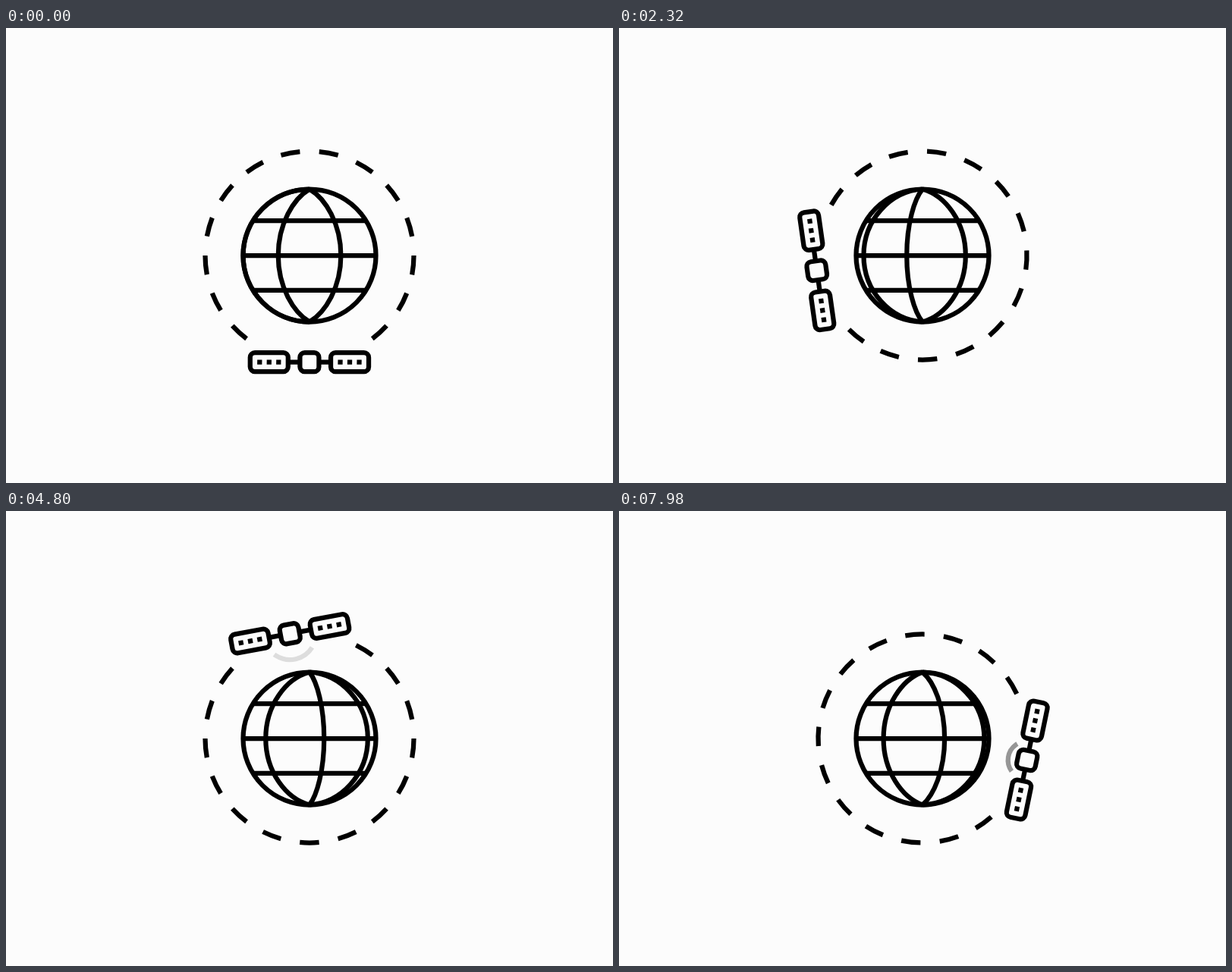
An HTML page with a canvas that plays this animation: 800x600 px, repeating every 8 s.

```html
<!DOCTYPE html>
<html lang="en">
<head>
<meta charset="utf-8">
<title>Satellite orbiting a globe</title>
<style>
  html, body { margin: 0; height: 100%; overflow: hidden; background: #fcfcfc; }
  canvas { display: block; }
</style>
</head>
<body>
<canvas width="800" height="600"></canvas>
<script>
const ctx = document.querySelector('canvas').getContext('2d');

const LOOP = 8000;
const ORBIT_TIME = 10200;
const MERIDIAN_TIME = ORBIT_TIME / 10;
const PULSE_TIME = ORBIT_TIME / 8;
const FADE = 255;

const BACKGROUND = '#fcfcfc';
const GLOBE_R = 87.5;
const ORBIT_R = 137.5;
const SATELLITE_R = 140.625;
const DASH_STEP = 2 * Math.PI / 17;

const lerp = (a, b, k) => a + (b - a) * k;
const clamp = v => Math.min(1, Math.max(0, v));

function stroke(draw) {
  ctx.beginPath();
  draw();
  ctx.stroke();
}

function line(x1, y1, x2, y2) {
  stroke(() => { ctx.moveTo(x1, y1); ctx.lineTo(x2, y2); });
}

function arc(r, from, to) {
  stroke(() => ctx.arc(0, 0, r, from, to));
}

// phase runs from -1.5 (left rim) to 1.5 (right rim); within ±0.5 the curve is a pointed lens side
function drawMeridian(phase) {
  const h = Math.abs(phase);
  const m = Math.min(1, 2 * h);
  const w = Math.max(0, h - 0.5);
  const width = Math.sign(phase) * (m + 0.15 * m * (1 - m * m));
  const round = w + 0.3 * w * (1 - w);

  const x = width * lerp(41.3, GLOBE_R, round);
  const tipX = width * lerp(21, 48.3, round);
  const tipY = GLOBE_R - lerp(12.5, 0, round);
  const sideY = lerp(42, 48.3, round);
  stroke(() => {
    ctx.moveTo(0, -GLOBE_R);
    ctx.bezierCurveTo(tipX, -tipY, x, -sideY, x, 0);
    ctx.bezierCurveTo(x, sideY, tipX, tipY, 0, GLOBE_R);
  });
}

function drawGlobe(t) {
  arc(GLOBE_R, 0, 2 * Math.PI);
  for (const y of [-45.8, 0, 45.8]) {
    const half = Math.sqrt(GLOBE_R ** 2 - y ** 2);
    line(-half, y, half, y);
  }
  const turn = t / MERIDIAN_TIME % 1;
  for (const start of [-1.5, -0.5, 0.5]) drawMeridian(start + turn);
}

function drawOrbit() {
  for (let k = -6.5; k <= 6.5; k++) {
    const middle = k * DASH_STEP - Math.PI / 2;
    arc(ORBIT_R, middle - DASH_STEP / 4, middle + DASH_STEP / 4);
  }
}

function drawBox(x, width) {
  ctx.beginPath();
  ctx.roundRect(x - width / 2, -12.5, width, 25, 6.25);
  ctx.fillStyle = BACKGROUND;
  ctx.fill();
  ctx.stroke();
}

function drawWave(r, age, fadeIn, fadeOut) {
  const spread = 0.83;
  ctx.globalAlpha = clamp((age - fadeIn) / FADE) * (1 - clamp((age - fadeOut) / FADE));
  arc(r, -Math.PI / 2 - spread, -Math.PI / 2 + spread);
  ctx.globalAlpha = 1;
}

function drawSatellite(t) {
  const age = t % PULSE_TIME;
  drawWave(25, age, 228, 702);
  drawWave(34.4, age, 370, 752);

  line(-28, 0, 28, 0);
  drawBox(0, 25);
  for (const x of [-53.125, 53.125]) {
    drawBox(x, 50);
    ctx.fillStyle = '#000';
    for (const dx of [-12.5, 0, 12.5]) ctx.fillRect(x + dx - 3.125, -3.125, 6.25, 6.25);
  }
}

function frame(now) {
  const t = now % LOOP;
  ctx.setTransform(1, 0, 0, 1, 0, 0);
  ctx.fillStyle = BACKGROUND;
  ctx.fillRect(0, 0, 800, 600);
  ctx.strokeStyle = '#000';
  ctx.lineWidth = 6.25;

  ctx.translate(400, 300);
  drawGlobe(t);
  ctx.rotate(2 * Math.PI * t / ORBIT_TIME);
  drawOrbit();
  ctx.translate(0, SATELLITE_R);
  drawSatellite(t);
  requestAnimationFrame(frame);
}
requestAnimationFrame(frame);
</script>
</body>
</html>
```
